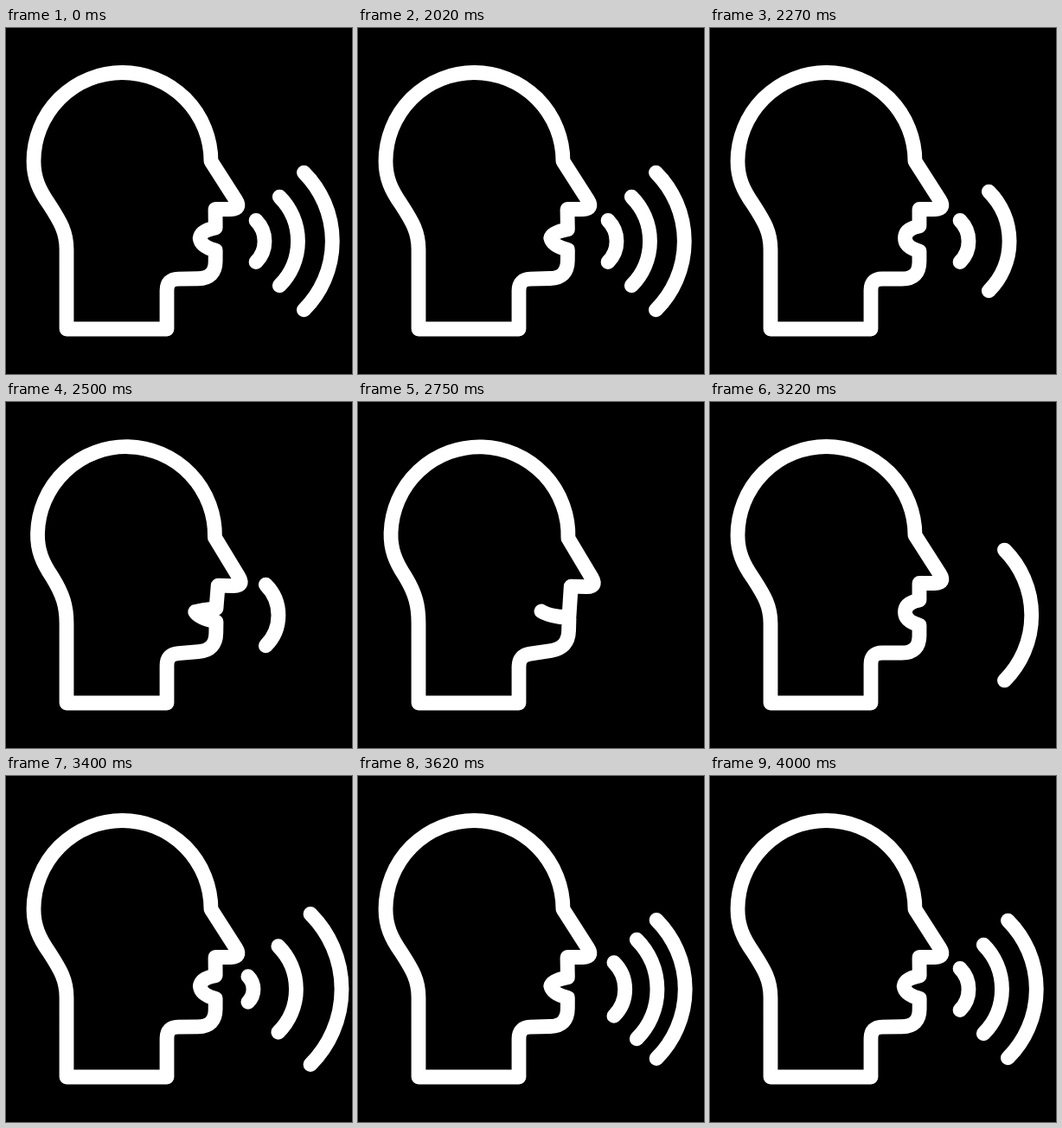
An HTML page for the animation above (4.02 s loop, 400 by 400 pixels).

```html
<!DOCTYPE html>
<html lang="en">
<head>
<meta charset="utf-8">
<title>Speaking head</title>
<style>
  html, body { margin: 0; width: 100%; height: 100%; overflow: hidden; background: #000; }
  svg { display: block; width: 100vw; height: 100vh; }
  path { fill: none; stroke: #fff; stroke-width: 16.8; stroke-linecap: round; stroke-linejoin: round; }
</style>
</head>
<body>
<svg viewBox="0 0 400 400">
  <path id="head"/>
  <path class="wave"/>
  <path class="wave"/>
  <path class="wave"/>
</svg>
<script>
const LOOP = 4020;
const START = 2020;
const NOD = 0.031;
const RADII = [112.3, 72.5, 34];

const head = document.getElementById("head");
const waves = document.querySelectorAll(".wave");

const lerp = (a, b, k) => a + (b - a) * k;
const mix = (p, q, k) => [lerp(p[0], q[0], k), lerp(p[1], q[1], k)];
const smooth = (t, from, to) => {
  const u = Math.min(1, Math.max(0, (t - from) / (to - from)));
  return u * u * (3 - 2 * u);
};

// Line to a rounded corner between two neighbouring points
function bend(before, corner, after, radius) {
  const toward = p => mix(corner, p, radius / Math.hypot(p[0] - corner[0], p[1] - corner[1]));
  return `L${toward(before)} Q${corner} ${toward(after)}`;
}

// 0 is wide open, 1 is shut
function jawClosure(t) {
  if (t < START) return 0.1;
  const talk = 0.2 * (1 - smooth(t, 2020, 2270)) + 0.2 * smooth(t, 3220, 3620) - 0.1 * smooth(t, 3620, 4000);
  return talk + smooth(t, 2350, 2650) - smooth(t, 2900, 3180);
}

function headPath(t) {
  const angle = NOD * (smooth(t, 2300, 2600) - smooth(t, 2980, 3200));
  const cos = Math.cos(angle), sin = Math.sin(angle);
  // Skull points turn about the middle of the neck's base
  const skull = (x, y) => {
    const dx = x - 128, dy = y - 348;
    return [128 + dx * cos - dy * sin, 348 + dx * sin + dy * cos];
  };

  const shut = jawClosure(t);
  const base = [186, 348];
  const throat = mix([186, 290], [186, 293], shut);
  const chin = mix([242, 290], [243, 284.5], shut);
  const lower = mix([242, 258], [244, 250], shut);
  const upper = mix([242, 229], [244, 248], shut);
  const corner = mix([225.5, 243], [212, 242], shut);
  const pull = lerp(8, 5, shut);
  const inside = side => [corner[0] + 8 * shut, corner[1] + lerp(side * 8, 5, shut)];

  const brow = skull(237, 154), noseTip = skull(272.5, 209.5), noseBase = skull(242, 209.5);
  return `M70 348 L${base}
    ${bend(base, throat, chin, 13)}
    ${bend(throat, chin, lower, 20)}
    L${lower}
    C${lower[0] - 10} ${lower[1] - 3 + 2 * shut} ${inside(1)} ${corner}
    C${inside(-1)} ${upper[0] - 10} ${upper[1] + lerp(2, 1, shut)} ${upper}
    L${noseBase} ${bend(noseBase, noseTip, brow, 13)}
    L${brow} A102.5 102.5 0 0 0 ${skull(32, 154)}
    C${skull(32, 173)} ${skull(38, 187)} ${skull(50, 204)}
    C${skull(63, 224)} 70 236 70 256 Z`;
}

// Offset from the resting radius; null while the wave is gone
function waveOffset(t, index) {
  const out = t - START - 125 * index;
  if (out < 240) return 16 * smooth(out, 0, 240);
  const back = t - 3060 - 165 * index;
  if (back < 0) return null;
  return -13 + 25 * smooth(back, 105, 260) - 12 * smooth(back, 270, 620);
}

// Quarter circle opening towards the mouth
function wavePath(t, index) {
  const offset = waveOffset(t, index);
  if (offset === null) return "";
  const r = RADII[index] + offset;
  const d = r * Math.SQRT1_2;
  return `M${265 + d} ${246.5 - d} a${r} ${r} 0 0 1 0 ${2 * d}`;
}

function draw(t) {
  head.setAttribute("d", headPath(t));
  waves.forEach((wave, i) => wave.setAttribute("d", wavePath(t, i)));
}

const began = performance.now();
function tick() {
  draw((performance.now() - began) % LOOP);
  requestAnimationFrame(tick);
}
tick();
</script>
</body>
</html>
```
